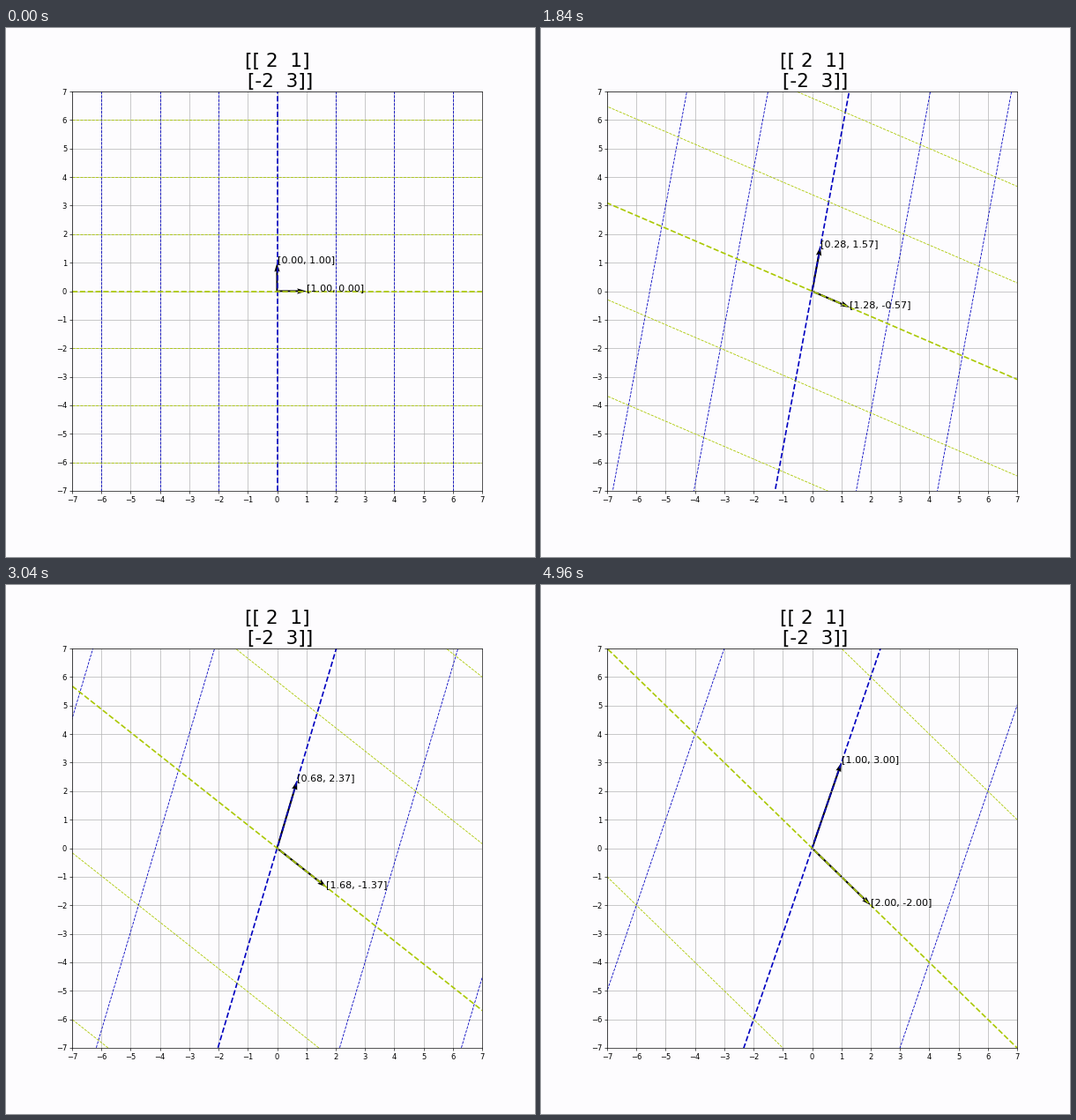
A matplotlib script that plays this animation: 600 by 600 pixels, repeating every 5.04 s.

```python
import matplotlib.pyplot as plt
import numpy as np
from matplotlib.animation import FuncAnimation

INTERVAL = 40
FRAMES = 126
HOLD_STEPS = 20
MORPH_STEPS = 60
LIMIT = 7
BACKGROUND = "#fdfcfe"
BLUE = "#0000c0"
LIME = "#aac800"

matrix = np.array([[2, 1], [-2, 3]])
identity = np.eye(2)

plt.rcParams["font.family"] = "DejaVu Sans"
fig = plt.figure(figsize=(10, 10), dpi=60, facecolor=BACKGROUND)
ax = fig.add_axes([0.125, 0.125, 0.775, 0.755], facecolor=BACKGROUND)
ax.set(xlim=(-LIMIT, LIMIT), ylim=(-LIMIT, LIMIT))
ax.set_xticks(range(-LIMIT, LIMIT + 1))
ax.set_yticks(range(-LIMIT, LIMIT + 1))
ax.grid(True)
ax.set_title(str(matrix), fontsize=26)

arrows = ax.quiver([0, 0], [0, 0], [1, 0], [0, 1], color="black",
                   angles="xy", scale_units="xy", scale=1, width=0.0045)
labels = [ax.text(0, 0, "", fontsize=13.3) for _ in range(2)]


def grid_lines(axis, color):
    """Dashed lines along one basis vector, spaced along the other."""
    lines = []
    for offset in range(-6, 7, 2):
        points = np.full((2, 2), float(offset))
        points[axis] = -LIMIT, LIMIT
        line, = ax.plot(*points, "--", color=color, lw=1 if offset else 2)
        lines.append((line, points))
    return lines


plane = grid_lines(1, BLUE) + grid_lines(0, LIME)


def update(frame):
    # The motion advances every 50 ms, sampled on a 40 ms clock.
    step = int(frame * INTERVAL / 50 + 0.3) - HOLD_STEPS
    progress = np.clip(step / MORPH_STEPS, 0, 1)
    transform = identity + progress * (matrix - identity)

    for line, points in plane:
        line.set_data(*(transform @ points))
    arrows.set_UVC(*transform)
    for label, (x, y) in zip(labels, transform.T):
        label.set_position((x, y))
        label.set_text(f"[{x:.2f}, {y:.2f}]")
    return [line for line, _ in plane] + [arrows, *labels]


anim = FuncAnimation(fig, update, frames=FRAMES, interval=INTERVAL,
                     repeat=True, repeat_delay=0)
plt.show()
```
